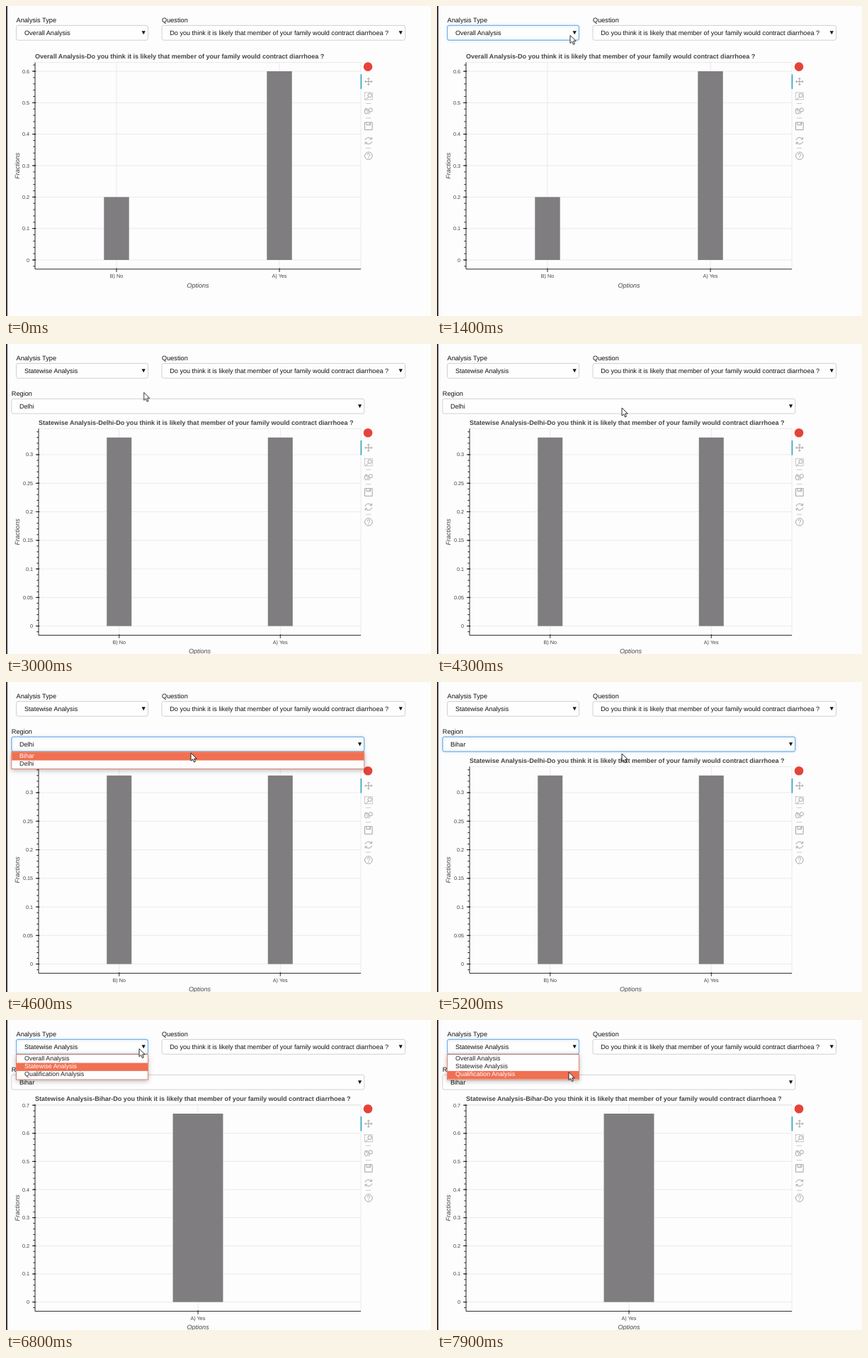
These frames come from a looping animation (600 px wide and 437 px high, 8 s). An HTML page:

```html
<!DOCTYPE html>
<html lang="en">
<head>
<meta charset="utf-8">
<title>Survey dashboard</title>
<style>
html, body { margin: 0; width: 100%; height: 100%; overflow: hidden; background: #fefdfe; }
svg { display: block; width: 600px; height: 437px; font-family: "Liberation Sans", Arial, sans-serif; text-rendering: geometricPrecision; }

.label { font-size: 9.2px; fill: #111; }
.value { font-size: 9.08px; fill: #111; }
.item { font-size: 8.93px; fill: #222; }
.hot { fill: #fff; }
.title { font-size: 9.06px; font-weight: bold; fill: #444; }
.axis { font-size: 9.06px; font-style: italic; fill: #444; }
.tick { font-size: 7.25px; fill: #444; }
.end { text-anchor: end; }
.mid { text-anchor: middle; }
.grid { stroke: #e5e5e5; stroke-width: .8; fill: none; }
.line { stroke: #111; stroke-width: .9; fill: none; }
.bar { fill: #7f7d7f; }
.box { fill: #fefefe; stroke: #ccc; stroke-width: .9; }
.focus { fill: none; stroke: #66afe9; filter: drop-shadow(0 0 2px #66afe999); }
.menu { fill: #fefefe; stroke: #d9694f; stroke-width: .8; filter: drop-shadow(0 2px 3px #0004); }
.row { fill: #f07052; }
.icon { fill: none; stroke: #a3a3a3; stroke-width: 1; }

.anim { animation: 8s step-end infinite; }
.overall { animation-name: overall; }
.delhi { animation-name: delhi; }
.bihar { animation-name: bihar; }
.low { animation-name: low; }
.was { animation-name: was; }
.now { animation-name: now; }
.first { animation-name: first; }
.second { animation-name: second; }
.focusA { animation-name: focusA; }
.focusB { animation-name: focusB; }
.menuA { animation-name: menuA; }
.menuB { animation-name: menuB; }
.a0 { animation-name: a0; }
.a1 { animation-name: a1; }
.a2 { animation-name: a2; }
.b0 { animation-name: b0; }
.b1 { animation-name: b1; }
.cursor { animation-name: cursor; }

@keyframes overall { 0% { opacity: 1 } 35% { opacity: 0 } }
@keyframes delhi { 0% { opacity: 0 } 35% { opacity: 1 } 66.25% { opacity: 0 } }
@keyframes bihar { 0% { opacity: 0 } 66.25% { opacity: 1 } }
@keyframes low { 0% { opacity: 0 } 35% { opacity: 1 } }
@keyframes was { 0% { opacity: 1 } 31.25% { opacity: 0 } }
@keyframes now { 0% { opacity: 0 } 31.25% { opacity: 1 } }
@keyframes first { 0% { opacity: 1 } 62.5% { opacity: 0 } }
@keyframes second { 0% { opacity: 0 } 62.5% { opacity: 1 } }
@keyframes focusA { 0% { opacity: 0 } 17.5% { opacity: 1 } 35% { opacity: 0 } 80% { opacity: 1 } }
@keyframes focusB { 0% { opacity: 0 } 55% { opacity: 1 } 66.25% { opacity: 0 } }
@keyframes menuA { 0% { opacity: 0 } 18.75% { opacity: 1 } 31.25% { opacity: 0 } 81.25% { opacity: 1 } }
@keyframes menuB { 0% { opacity: 0 } 56.25% { opacity: 1 } 62.5% { opacity: 0 } }
@keyframes a0 { 0% { opacity: 1 } 27.5% { opacity: 0 } }
@keyframes a1 { 0% { opacity: 0 } 27.5% { opacity: 1 } 96.25% { opacity: 0 } }
@keyframes a2 { 0% { opacity: 0 } 96.25% { opacity: 1 } }
@keyframes b0 { 0% { opacity: 0 } 57.5% { opacity: 1 } }
@keyframes b1 { 0% { opacity: 1 } 57.5% { opacity: 0 } }
@keyframes cursor {
  0% { transform: translate(-14px, 170px) }
  8.75% { transform: translate(-14px, 170px); animation-timing-function: steps(5) }
  15% { transform: translate(188px, 40px); animation-timing-function: steps(6) }
  22.5% { transform: translate(188px, 44px); animation-timing-function: steps(5) }
  28.75% { transform: translate(184.5px, 65px) }
  36.25% { transform: translate(184.5px, 65px); animation-timing-function: steps(4) }
  41.25% { transform: translate(225px, 78px); animation-timing-function: steps(8) }
  51.25% { transform: translate(261px, 90px) }
  53.75% { transform: translate(261px, 90px); animation-timing-function: steps(3) }
  57.5% { transform: translate(261px, 100px) }
  62.5% { transform: translate(261px, 101px) }
  73.75% { transform: translate(261px, 101px); animation-timing-function: steps(5) }
  80% { transform: translate(188px, 40.5px) }
  86.25% { transform: translate(188px, 40.5px); animation-timing-function: steps(8) }
  96.25%, 100% { transform: translate(186px, 73.5px) }
}
</style>
</head>
<body>
<svg id="stage" viewBox="0 0 600 437"></svg>
<script>
const text = (x, y, cls, s, extra = '') => `<text x="${x}" y="${y}" class="${cls}" ${extra}>${s}</text>`;
const path = (cls, d) => `<path class="${cls}" d="${d}"/>`;
const rect = (cls, x, y, w, h, r = 0) => `<rect class="${cls}" x="${x}" y="${y}" width="${w}" height="${h}" rx="${r}"/>`;
const group = (cls, body) => `<g class="anim ${cls}">${body}</g>`;

const question = 'Do you think it is likely that member of your family would contract diarrhoea ?';

function toolbar(dy) {
  const at = (y, body) => `<g transform="translate(511.8 ${y})">${body}</g>`;
  const icon = (y, d) => at(y, path('icon', d));
  const rule = y => icon(y, 'M-4 0H3.5').replace('/>', ' opacity=".55"/>');
  return `<g transform="translate(0 ${dy})">` +
    '<circle cx="511" cy="85.6" r="6.3" fill="#e5433a"/>' +
    rect('', 500.6, 96.3, 1.5, 20.6).replace('class=""', 'fill="#26a0c4"') +
    icon(106.5, 'M-5 0H5M0-5V5M-3.5-1.7L-5.2 0L-3.5 1.7M3.5-1.7L5.2 0L3.5 1.7M-1.7-3.5L0-5.2L1.7-3.5M-1.7 3.5L0 5.2L1.7 3.5') +
    at(127, '<rect class="icon" x="-5.5" y="-5" width="11" height="10" stroke-dasharray="1.5 1"/>' +
      '<circle class="icon" cx="1.8" cy="-1" r="2.7"/>' + path('icon', 'M0 1L-4.5 5.3')) +
    rule(137.5) +
    at(148, '<rect class="icon" x="-5.4" y="-3.5" width="4.6" height="7.4" rx="2.3"/>' +
      '<circle class="icon" cx="3" cy="-1.5" r="2.6"/>' + path('icon', 'M-3.1-3V0M1.7 1L.3 4.5')) +
    rule(158) +
    icon(169.3, 'M-5.3-5.3H5.3V5.3H-5.3ZM-2.8-5V-1.5H2.8V-5M1.2-4.5V-2.5') +
    icon(190, 'M-4.9-.8A5 4.6 0 0 1 4-2.8M4.6-5V-2.2H1.7M4.9.8A5 4.6 0 0 1-4 2.8M-4.6 5V2.2H-1.7') +
    rule(200.4) +
    at(211.2, '<circle class="icon" r="5.3"/>' + path('icon', 'M-1.8-1.2A1.8 1.8 0 1 1 .8 .2Q0 .7 0 1.6M0 2.6V3.6')) +
    '</g>';
}

// ticks: count of labelled steps above zero, each "step" in value and "gap" in pixels
function chart({ left, top, zero, step, gap, ticks, name, bars }) {
  const right = 501, base = top + 291.3, w = right - left, slot = w / bars.length;
  let out = text(left, top - 5.2, 'title', `${name}-${question}`);
  let grid = `M${left} ${top}H${right}V${base}`, marks = `M${left} ${top}V${base}H${right}`;
  let labels = '', cols = '';
  for (let i = 0; i <= ticks; i++) {
    const y = zero - i * gap;
    grid += `M${left} ${y}H${right}`;
    marks += `M${left - 4.1} ${y}h5.5`;
    labels += text(left - 8, y + 2.5, 'tick end', +(i * step).toFixed(2));
  }
  for (let y = zero + gap / 5; y > top; y -= gap / 5) marks += `M${left - 2.7} ${y}h2.7`;
  bars.forEach(([label, v], i) => {
    const x = left + slot * (i + .5), h = v / step * gap, bw = slot * .154;
    grid += `M${x} ${top}V${base}`;
    marks += `M${x} ${base - 1.4}v5.5`;
    labels += text(x, base + 12.1, 'tick mid', label);
    cols += rect('bar', x - bw / 2, zero - h, bw, h);
  });
  const cy = top + 145.6;
  return out + path('grid', grid) + cols + path('line', marks) + labels +
    text(left + w / 2, base + 25.8, 'axis mid', 'Options') +
    text(19.3, cy, 'axis mid', 'Fractions', `transform="rotate(-90 19.3 ${cy})"`) +
    toolbar(top - 79.6);
}

const arrow = (x, y) => `<path d="M${x - 2.6} ${y - 2.4}h5.2l-2.6 5z" fill="#111"/>`;
const select = (x, y, w, label) => text(x, y - 4, 'label', label) +
  rect('box', x, y, w, 20.8, 2.5) + arrow(x + w - 6.3, y + 10.3);
const focus = (cls, x, y, w) => group(cls, rect('focus', x, y, w, 20.8, 2.5));

function menu(cls, key, x, y, w, tx, items) {
  const h = 11.4;
  return group(cls, rect('menu', x, y, w, items.length * h + 1.4) + items.map((s, i) => {
    const ty = y + 8.2 + i * h;
    return text(tx, ty, 'item', s) +
      group(key + i, rect('row', x + .4, y + .7 + i * h, w - .8, h) + text(tx, ty, 'item hot', s));
  }).join(''));
}

const plain = { left: 41, top: 79.6, zero: 358, step: .1, gap: 44.33, ticks: 6,
  name: 'Overall Analysis', bars: [['B) No', .2], ['A) Yes', .6]] };
const delhi = { left: 46, top: 119.3, zero: 397.6, step: .05, gap: 40.27, ticks: 6,
  name: 'Statewise Analysis-Delhi', bars: [['B) No', .33], ['A) Yes', .33]] };
const bihar = { left: 41, top: 119.3, zero: 397.6, step: .1, gap: 39.64, ticks: 7,
  name: 'Statewise Analysis-Bihar', bars: [['A) Yes', .67]] };

document.getElementById('stage').innerHTML =
  '<rect width="600" height="437" fill="#fefdfe"/><rect width="2" height="437" fill="#37343a"/>' +
  group('overall', chart(plain)) + group('delhi', chart(delhi)) + group('bihar', chart(bihar)) +
  group('low', select(7.8, 77.3, 498, 'Region') +
    group('first', text(19, 90.6, 'value', 'Delhi')) +
    group('second', text(19, 90.6, 'value', 'Bihar'))) +
  focus('focusB', 7.8, 77.3, 498) +
  select(14.5, 27.4, 186, 'Analysis Type') +
  group('was', text(26, 40.7, 'value', 'Overall Analysis')) +
  group('now', text(26, 40.7, 'value', 'Statewise Analysis')) +
  focus('focusA', 14.5, 27.4, 186) +
  select(220, 27.4, 343.5, 'Question') + text(231.3, 40.7, 'value', question) +
  menu('menuA', 'a', 14.5, 48.4, 186, 26, ['Overall Analysis', 'Statewise Analysis', 'Qualification Analysis']) +
  menu('menuB', 'b', 7.8, 98.4, 498, 19, ['Bihar', 'Delhi']) +
  group('cursor', '<path d="M0 0V11.2L2.6 8.8L4.5 13L6.4 12.1L4.6 8.1H8.2Z" fill="#fff" stroke="#111" stroke-width=".9"/>');
</script>
</body>
</html>
```
